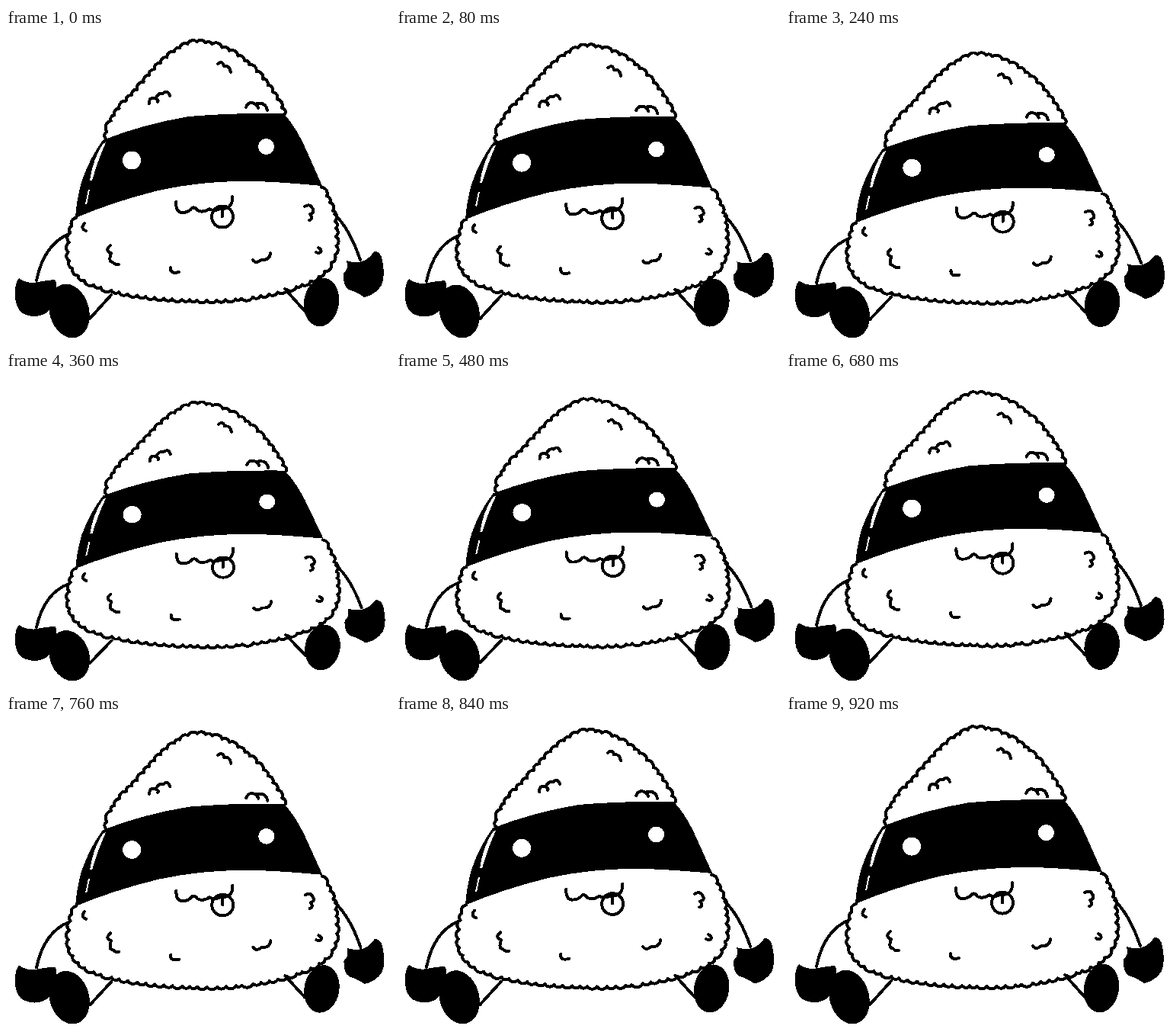
Recreate the animation shown at these times as an HTML page. Size 504 by 413 pixels, loop 0.96 s.

```html
<!DOCTYPE html>
<html lang="en">
<head>
<meta charset="utf-8">
<title>Bouncing rice ball</title>
<style>
html, body { margin: 0; width: 100%; height: 100%; overflow: hidden; background: #fff; }
svg { display: block; width: 504px; height: 413px; }
.line { fill: none; stroke: #000; stroke-width: 4; stroke-linecap: round; stroke-linejoin: round; }
</style>
</head>
<body>
<svg viewBox="0 0 504 413" shape-rendering="crispEdges">
  <g id="figure">
    <!-- limbs -->
    <path class="line" d="M83 270Q50 283 40 331M431 244Q451 263 465 304M138 350L110 381M366 342L392 371"/>
    <path d="M17 328Q25 334 36 334Q52 331 64 330Q68 336 65 345Q62 368 52 374Q38 382 22 374Q11 366 12 346Q12 334 17 328Z"/>
    <path d="M447 305Q460 309 470 305Q478 301 483 293Q492 292 494 305Q498 325 493 337Q485 350 470 353Q460 346 450 343Q442 338 443 322Q450 316 447 305Z"/>
    <ellipse cx="83" cy="371" rx="26" ry="36" transform="rotate(-15 83 371)"/>
    <ellipse cx="414" cy="359.5" rx="23" ry="32" transform="rotate(9 414 359.5)"/>
    <!-- rice outline: smooth guides, turned into bumps by script -->
    <path class="line" id="top" d="M131 145C134 112 160 96 178 74S215 30 245 18C290 18 335 48 366 113"/>
    <path class="line" id="base" d="M414 209C425 225 434 245 433 275C434 285 436 305 412 325C380 345 320 357 265 357C205 356 150 351 110 335C88 325 80 305 82 290C84 275 84 258 92 249"/>
    <!-- mask -->
    <path d="M127 147Q180 126 240 116Q300 111 364 112Q380 128 395 162L415 207Q350 201 320 201Q260 200 200 213Q140 228 91 249Q92 228 99 202Q110 170 127 147Z"/>
    <path fill="#fff" d="M131 150Q120 175 113 200H110Q114 172 127 152Z"/>
    <path fill="none" stroke="#fff" stroke-width="2" d="M109 212L105 231"/>
    <circle cx="165" cy="173.500" r="12" fill="#fff"/>
    <circle cx="341.500" cy="155.500" r="10.500" fill="#fff"/>
    <!-- mouth and tongue -->
    <path class="line" d="M223 228Q223 242 231 242Q240 242 244 236Q248 234 251 239Q258 243 267 237Q272 241 281 237Q298 238 297 221"/>
    <circle class="line" cx="284" cy="247.500" r="14"/>
    <path class="line" d="M284 238V247"/>
    <!-- grains -->
    <path class="line" d="M278 47Q284 42 286 50Q293 48 295 58
      M188 99Q188 90 195 92Q201 94 199 97M197 91Q201 84 206 86Q212 80 215 89
      M315 104Q318 96 326 99Q330 101 331 105M329 99Q341 97 343 108
      M103 256Q97 263 105 266
      M137 285Q129 292 138 295Q134 307 140 307Q143 311 148 310
      M216 314Q215 323 227 320
      M324 304Q328 310 335 304Q346 305 347 295
      M392 234Q399 230 402 236Q406 242 399 244Q404 250 398 252
      M410 288Q415 291 413 294Q410 296 407 294"/>
  </g>
</svg>
<script>
const LOOP = 960, STEP = 40;
const FLOOR = 407, LEFT = 12, HEIGHT = 393;
const LOW = 370, REST = 925, DEPTH = 25.5;   // lowest time, back-up time, drop in px

const el = id => document.getElementById(id);

let seed = 7;
function random() {
  seed = seed * 16807 % 2147483647;
  return seed / 2147483647;
}

// Replaces a smooth clockwise path by a row of slightly uneven bumps.
function scallop(path, count) {
  const total = path.getTotalLength();
  let last, d = '';
  for (let i = 0; i <= count; i++) {
    const jitter = i % count ? (random() - 0.5) * 0.4 : 0;
    const p = path.getPointAtLength(total * (i + jitter) / count);
    if (last) {
      const r = 0.6 * Math.hypot(p.x - last.x, p.y - last.y);
      d += `A${r} ${r} 0 0 1 ${p.x} ${p.y}`;
    } else {
      d = `M${p.x} ${p.y}`;
    }
    last = p;
  }
  path.setAttribute('d', d);
}

scallop(el('top'), 30);
scallop(el('base'), 46);

// Sinks at an even pace, then rises more slowly.
function drop(t) {
  return DEPTH * Math.max(0, Math.min(t / LOW, (REST - t) / (REST - LOW)));
}

function draw(now) {
  const d = drop(Math.floor(now % LOOP / STEP) * STEP);
  const sx = 1 + 0.00015 * d, sy = 1 - d / HEIGHT;
  el('figure').setAttribute('transform',
    `translate(${LEFT} ${FLOOR}) scale(${sx} ${sy}) translate(${-LEFT} ${-FLOOR})`);
}

function tick() {
  draw(performance.now());
  requestAnimationFrame(tick);
}
tick();
</script>
</body>
</html>
```
